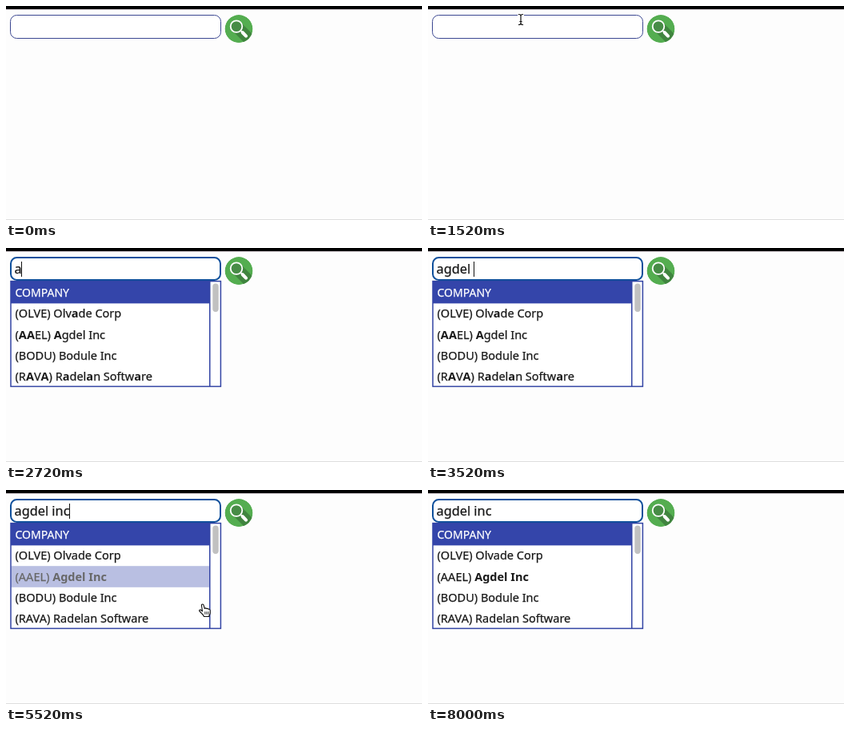
An HTML page for the animation above (8320 ms loop, 520 px wide and 268 px high).

```html
<!DOCTYPE html>
<html lang="en">
<head>
<meta charset="utf-8">
<title>Search suggestions</title>
<style>
  html, body { margin: 0; width: 100%; height: 100%; overflow: hidden; background: #fdfdfd; }
  svg { display: block; width: 520px; height: 268px; }
  text {
    font-family: "Noto Sans", "Open Sans", sans-serif; font-size: 14.5px; white-space: pre;
    color: #1a1a1a; fill: currentColor; stroke: currentColor; stroke-width: .25px;
  }
  .bold { font-weight: 700; stroke: none; }
</style>
</head>
<body>
<svg viewBox="0 0 520 268" xmlns="http://www.w3.org/2000/svg">
  <defs>
    <clipPath id="disc"><circle cx="291" cy="28.6" r="17.5"/></clipPath>
    <path id="beamShape" d="M-2.5 -6.5 Q0 -6.5 0 -4.5 Q0 -6.5 2.5 -6.5 M0 -4.5 V4.5 M-2.5 6.5 Q0 6.5 0 4.5 Q0 6.5 2.5 6.5 M-1 2.5 H1"/>
    <path id="resizeShape" d="M-6 -1.3 H6 M-6 1.3 H6 M0 -5 V5 M-1.7 -4.2 L0 -6 L1.7 -4.2Z M-1.7 4.2 L0 6 L1.7 4.2Z"/>
  </defs>
  <rect width="520" height="268" fill="#fdfdfd"/>
  <rect width="520" height="4" fill="#000"/>
  <rect y="4" width="520" height="1" fill="#d8d0d5"/>
  <rect y="267" width="520" height="1" fill="#dedede"/>

  <rect id="field" fill="#fff"/>
  <text id="query" x="10.6" y="32" style="font-size:16.3px"></text>
  <rect id="caret" y="17" width="1" height="19" fill="#111"/>

  <g clip-path="url(#disc)">
    <circle cx="291" cy="28.6" r="17.5" fill="#54ad50"/>
    <path d="M293.2 20.3 L313 40 L306 54 L282.8 30.800Z" fill="#40853f"/>
    <circle cx="288" cy="25.600" r="7.300" fill="#478c46" stroke="#fff" stroke-width="1.800"/>
    <path d="M293.200 30.800 L295.500 33" stroke="#fff" stroke-width="1.800"/>
    <path d="M295.800 33.300 L300 37.600" stroke="#fff" stroke-width="4.200" stroke-linecap="round"/>
  </g>

  <g id="menu">
    <rect x="6" y="41.600" width="262.400" height="131.800" fill="#fff" stroke="#3344a4" stroke-width="1.500"/>
    <rect x="6" y="42" width="248" height="27.400" fill="#3445aa"/>
    <text x="11.500" y="61" style="color:#fff;font-size:14px">COMPANY</text>
    <rect id="hover" x="6.700" y="95.200" width="247.300" height="26.600" fill="#3445aa"/>
    <g id="rows"></g>
    <rect x="254" y="42" width="1.500" height="131" fill="#3344a4"/>
    <rect x="258.300" y="44.500" width="7.400" height="35.500" rx="3.700" fill="#c1c1c1"/>
  </g>

  <g id="beam" fill="none" stroke-linecap="square">
    <use href="#beamShape" stroke="#fff" stroke-width="3"/>
    <use href="#beamShape" stroke="#111" stroke-width="1.2"/>
  </g>
  <g id="resize">
    <use href="#resizeShape" stroke="#fff" stroke-width="3.2"/>
    <use href="#resizeShape" fill="#111" stroke="#111" stroke-width="1.3"/>
  </g>
  <g id="hand">
    <path d="M-1.500 1 Q-2 -1 -.3 -1 Q1 -1 1.300 1 L2.300 4.500 Q3.600 3.300 4.800 4.600 Q6 3.800 7 5.200 Q8.800 4.800 9.200 6.800 L9.300 10 Q9 12 7.900 13 V14.500 H1.500 Q.5 12 -1.500 10.500 L-4.300 7.500 Q-4.600 5.700 -2.700 6 L-.5 7.800Z"
      fill="#fff" stroke="#111" stroke-width="1.100" stroke-linejoin="round"/>
    <path d="M2.800 8.300 V11.700 M4.900 8.300 V11.700 M7 8.300 V11.700" stroke="#111" stroke-width=".9"/>
  </g>
</svg>
<script>
const LOOP = 8320, STEP = 80;
const $ = id => document.getElementById(id);

const names = [
  "(OLVE) Olvade Corp",
  "(AAEL) Agdel Inc",
  "(BODU) Bodule Inc",
  "(RAVA) Radelan Software"
];
const QUERY = "agdel inc";
const keyTimes = [2160, 2800, 2960, 3120, 3280, 3440, 3840, 3920, 4320];
const blinks = [4880, 5360, 5840, 6320, 6880, 7360, 7840];

const rows = names.map((name, i) => {
  const row = document.createElementNS("http://www.w3.org/2000/svg", "text");
  row.setAttribute("x", 11.5);
  row.setAttribute("y", 87.3 + i * 26.2);
  $("rows").append(row);
  return row;
});

function setAttrs(id, attrs) {
  for (const key in attrs) $(id).setAttribute(key, attrs[key]);
}

const show = (id, on) => { $(id).style.display = on ? "" : "none"; };

function place(id, on, x, y) {
  show(id, on);
  setAttrs(id, { transform: `translate(${x} ${y})` });
}

// The list answers the typed text with a delay.
function matcher(t) {
  if (t < 4080) return /a/gi;
  return t < 4720 ? /agdel i/gi : /agdel inc/gi;
}

function hoverLevel(t) {
  if (t < 5360 || t >= 5600) return 0;
  return t < 5440 ? 0.45 : t < 5520 ? 0.75 : 0.34;
}

function drawField(t) {
  const focus = t < 1680 ? 0 : t < 1760 ? 0.5 : 1;
  const line = 1 + focus;
  // The border grows inwards, so the outer edge stays put.
  setAttrs("field", {
    x: 5 + line / 2, y: 11 + line / 2,
    width: 264 - line, height: 30 - line, rx: 8.5 - line / 2,
    stroke: focus ? "#0f509c" : "#3b4791",
    "stroke-width": line
  });
  const typed = keyTimes.filter(k => k <= t).length;
  $("query").textContent = QUERY.slice(0, typed);
  const width = typed ? $("query").getComputedTextLength() : 0;
  setAttrs("caret", { x: Math.round(10.2 + width) });
  show("caret", t >= 1680 && blinks.filter(b => b <= t).length % 2 === 0);
}

function drawMenu(t) {
  show("menu", t >= 2640);
  const level = hoverLevel(t);
  setAttrs("hover", { "fill-opacity": level });
  const pattern = matcher(t);
  rows.forEach((row, i) => {
    row.innerHTML = names[i].replace(pattern, '<tspan class="bold">$&</tspan>');
    const shade = Math.round(26 + (i === 1 ? level : 0) * 229);
    row.style.color = `rgb(${shade},${shade},${shade})`;
  });
}

// The pointer rests in the field, then later sweeps down across the list.
function drawPointer(t) {
  const p = Math.min((t - 5040) / 480, 1);
  const x = 118 + 128 * p, y = 4.5 + 139.5 * p;
  const waiting = t >= 1440 && t < 2240;
  if (waiting) place("beam", true, t < 1520 ? 115 : 116, 17);
  else place("beam", t >= 5120 && t < 5200, x, y);
  place("resize", t >= 4880 && t < 5120, 118, 4.5 + Math.min(0, (t - 5040) / 40));
  place("hand", t >= 5200 && t < 5680, x, y);
}

let last = -1;
const start = performance.now();
function frame() {
  const t = Math.floor(((performance.now() - start) % LOOP) / STEP) * STEP;
  if (t !== last) {
    last = t;
    drawField(t);
    drawMenu(t);
    drawPointer(t);
  }
  requestAnimationFrame(frame);
}
frame();
</script>
</body>
</html>
```
